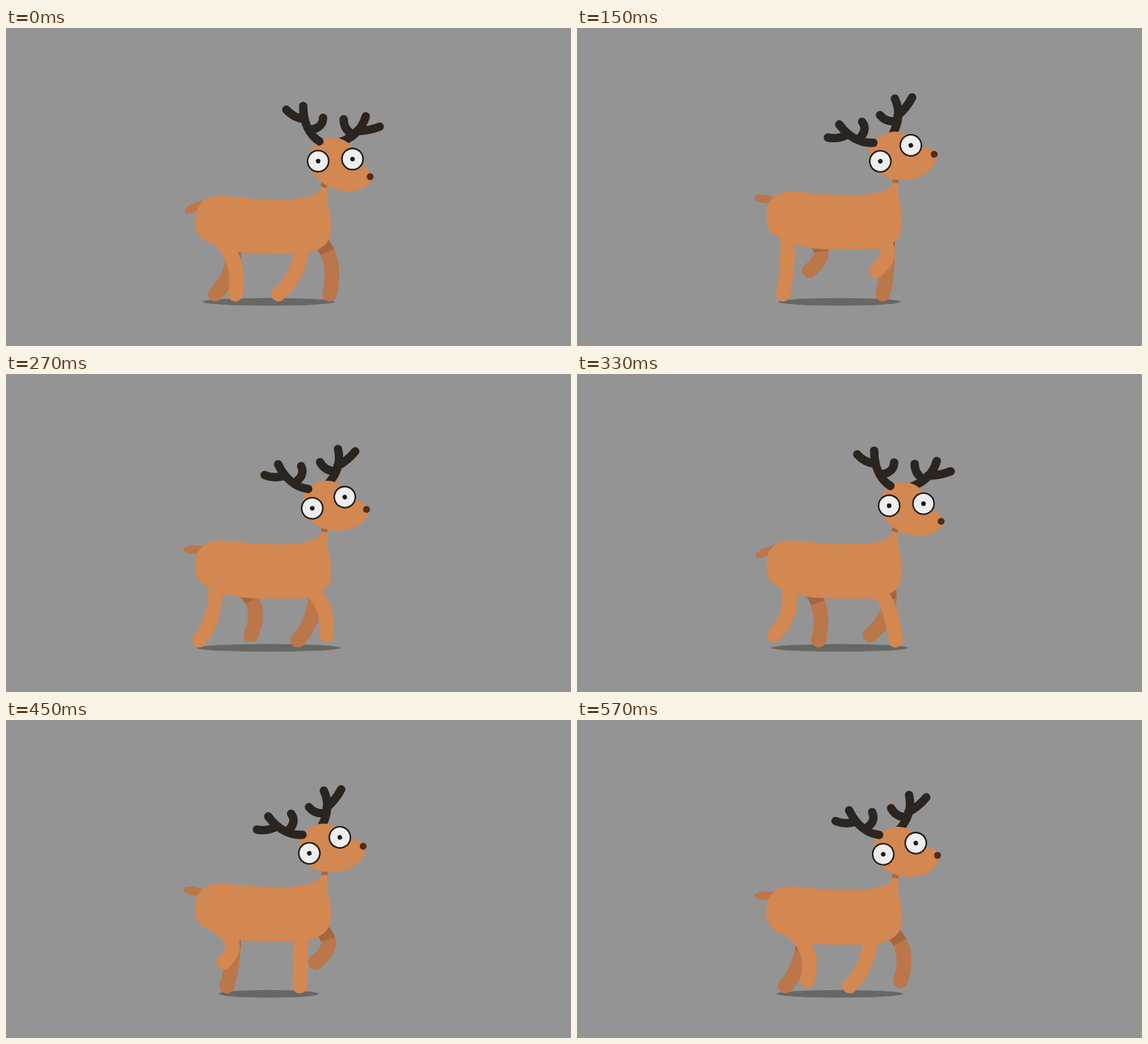
Write an HTML page with a canvas that moves like this. It is 768 px wide and 432 px high and loops after 600 ms.

```html
<!DOCTYPE html>
<html lang="en">
<head>
<meta charset="utf-8">
<title>Walking deer</title>
<style>
html, body { margin: 0; width: 100%; height: 100%; overflow: hidden; background: #949494; }
canvas { display: block; }
</style>
</head>
<body>
<canvas id="stage" width="768" height="432"></canvas>
<script>
const ctx = document.getElementById('stage').getContext('2d');
const LOOP = 600, STEP = 30, BEAT = LOOP / 2;
const FUR = '#d38751', FAR_FUR = '#bb764a', SHADE = '#a4673f', HORN = '#2b241f', INK = '#1d1b1a';

// Resting x of each joint, how far knee and foot swing, and how early the foot leads (ms)
const nearBack = { hip: 290, knee: 304, foot: 288, bend: 23, stride: 25, lead: 30 };
const farBack = { hip: 313, knee: 329, foot: 308, bend: 25, stride: 25, lead: 30, shade: 25 };
const nearFront = { hip: 405, knee: 419, foot: 403, bend: 25, stride: 33, lead: 10 };
const farFront = { hip: 425, knee: 438, foot: 418, bend: 18, stride: 22, lead: 10, shade: 16 };

const body = new Path2D(`M291 228 C315 229 335 233 368 233 C396 233 412 230 419 226
  C427 222 430 217 429.5 212 L437 212 C436 225 437 235 439 246 C442 262 443 276 440 284
  C436 297 420 304 408 306 C385 308 345 307 322 305.5 C300 303 278 294 266 286
  C258 279 257 270 257.5 258 C258 242 268 228 291 228Z`);
const tail = new Path2D('M5 -4 C-8 -7 -24 -6 -24 0 C-24 6 -8 7 5 4Z');
const head = new Path2D(`M416 164 C421 153 432 149 444 149 C459 149 468 157 471 164
  C474 176 484 184 493 193 C497 196 499 202 495 209 C488 219 476 222 464 222
  C444 221 424 209 418 197 C413 187 412 172 416 164Z`);
const leftHorn = new Path2D(`M426 154 C412 145 404 128 404 106
  M381 111 C388 119 398 123 406 124 M431 122 C431 131 425 137 413 138`);
const rightHorn = new Path2D(`M452 156 C470 150 484 138 489 120
  M459 124 C459 132 462 139 470 144 M508 134 C498 138 486 140 477 140`);

const wave = t => Math.cos(2 * Math.PI * t / LOOP);

// 0 to 1 and back once per beat: eases up, lingers, then snaps back and rests
function dip(t) {
  const s = 2 * Math.min(1, (t + BEAT - STEP) % BEAT / (BEAT - STEP)) - 1;
  return s < 0 ? Math.cos(Math.PI * s / 2) : 1 - s ** 4;
}

function turned(x, y, degrees, draw) {
  ctx.save();
  ctx.translate(x, y);
  ctx.rotate(degrees * Math.PI / 180);
  ctx.translate(-x, -y);
  draw();
  ctx.restore();
}

function fill(path, color) {
  ctx.fillStyle = color;
  ctx.fill(path);
}

function oval(x, y, rx, ry, color) {
  ctx.fillStyle = color;
  ctx.beginPath();
  ctx.ellipse(x, y, rx, ry, 0, 0, 2 * Math.PI);
  ctx.fill();
}

function line(path, color, width, cap = 'round') {
  ctx.strokeStyle = color;
  ctx.lineWidth = width;
  ctx.lineCap = cap;
  ctx.stroke(path);
}

// The foot rests on the ground for the first half of the cycle and is raised in the second
function leg(part, t, bob) {
  const reach = wave(t + part.lead), flex = wave(t + 80);
  const raise = 32 * Math.max(0, wave(t + LOOP / 4)) ** 1.3;
  const path = new Path2D();
  path.moveTo(part.hip + 5 * flex, 291 + bob);
  path.quadraticCurveTo(
    part.knee + part.bend * flex, 326 - 9 * reach - 0.6 * raise,
    part.foot + part.stride * reach, 361.5 - raise);
  line(path, part.shade ? FAR_FUR : FUR, 20);
  if (part.shade) {
    ctx.setLineDash([part.shade, 999]);
    line(path, SHADE, 20, 'butt');
    ctx.setLineDash([]);
  }
}

function eye(x, y) {
  oval(x, y, 15.4, 15.4, INK);
  oval(x, y, 13.3, 13.3, '#efeeee');
  oval(x, y, 3.1, 3.1, INK);
}

function drawHead(nod) {
  const sway = -13 * Math.min(1, 2 * nod * nod);
  turned(452, 157, sway * 1.25, () => line(rightHorn, HORN, 11.4));
  turned(433, 212, 24, () => {
    ctx.fillStyle = SHADE;
    ctx.fillRect(428.8, 208, 8.4, 8.5);
  });
  fill(head, FUR);
  turned(426, 154, sway, () => line(leftHorn, HORN, 11.4));
  eye(424.3, 180.8);
  eye(471, 178);
  oval(495, 202, 4.7, 4.7, '#552c10');
}

function draw(t) {
  const bob = -6 * Math.abs(Math.sin(Math.PI * t / BEAT));
  const nod = dip(t), tilt = -24.5 * nod;
  const spread = 84.6 - 3.8 * wave(t) + 7.5 * wave(t - LOOP / 4) + 9 * wave(2 * t);

  ctx.fillStyle = '#949494';
  ctx.fillRect(0, 0, 768, 432);
  oval(357, 372, spread, 5.2, '#666866');
  leg(farBack, t + BEAT, bob);
  leg(farFront, t, bob);

  ctx.save();
  ctx.translate(0, bob);
  turned(265, 240, -24 - 1.4 * tilt, () => {
    ctx.translate(265, 240);
    fill(tail, FAR_FUR);
  });
  fill(body, FUR);
  turned(433, 212, tilt, () => drawHead(nod));
  ctx.restore();

  leg(nearBack, t, bob);
  leg(nearFront, t + BEAT, bob);
}

function tick() {
  const t = performance.now() % LOOP;
  draw(Math.floor(t / STEP + 0.01) * STEP % LOOP);
  requestAnimationFrame(tick);
}
tick();
</script>
</body>
</html>
```
